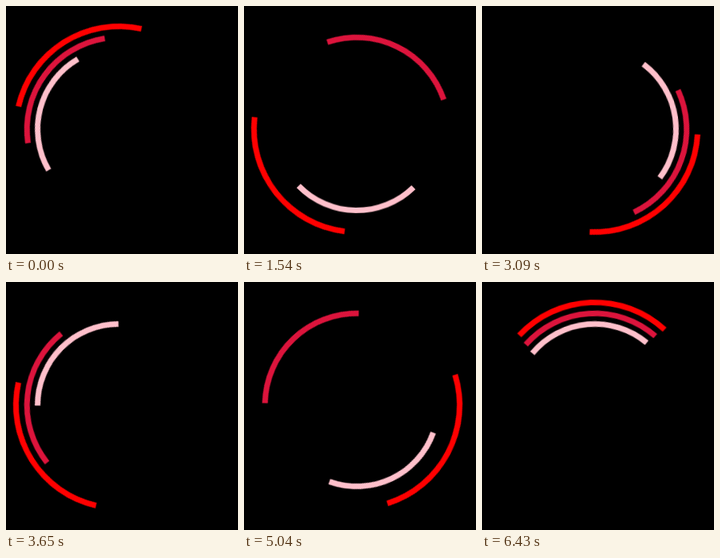
Animation, 290 px wide and 310 px high, one loop 6.5 s. Source, as an HTML page:

```html
<!DOCTYPE html>
<html lang="en">
<head>
<meta charset="utf-8">
<title>Three spinning arcs</title>
<style>
  html, body {
    margin: 0;
    width: 100%;
    height: 100%;
    overflow: hidden;
    background: #000;
  }
  svg {
    display: block;
    width: 290px;
    height: 310px;
  }
  /* A quarter ring, centred on twelve o'clock at zero turn */
  .arc {
    fill: none;
    stroke-width: 7;
    stroke-dasharray: 90 270;
    stroke-dashoffset: -225;
    transform-origin: 0 0;
    animation: spin 6500ms -1ms infinite;
  }
  .outer  { --speed: 3; stroke: red; }
  .middle { --speed: 5; stroke: crimson; }
  .inner  { --speed: 7; stroke: pink; }

  /* About 4deg times speed every 70ms, with a hard restart */
  @keyframes spin {
    0%       { transform: rotate(calc(var(--speed) * -10.75deg)); animation-timing-function: steps(37); }
    39.8462% { transform: rotate(calc(var(--speed) * 137.25deg)); animation-timing-function: steps(14); }
    54.9231% { transform: rotate(calc(var(--speed) * 194.68deg)); animation-timing-function: steps(1); }
    56.1538% { transform: rotate(calc(var(--speed) * 199.25deg)); animation-timing-function: steps(8); }
    64.6154% { transform: rotate(calc(var(--speed) * 231.25deg)); animation-timing-function: steps(29); }
    95.8462% { transform: rotate(calc(var(--speed) * 347.25deg)); animation-timing-function: steps(1); }
    97.2308% { transform: rotate(calc(var(--speed) * 351.25deg)); animation-timing-function: steps(1); }
    97.8462% { transform: rotate(calc(var(--speed) * 355.25deg)); animation-timing-function: steps(1); }
    98.9231%, 100% { transform: rotate(calc(var(--speed) * 359.25deg)); }
  }
</style>
</head>
<body>
<svg viewBox="0 0 290 310">
  <g transform="translate(141 154)">
    <circle class="arc outer" r="128.6" pathLength="360"/>
    <circle class="arc middle" r="114.8" pathLength="360"/>
    <circle class="arc inner" r="101.5" pathLength="360"/>
  </g>
</svg>
</body>
</html>
```
